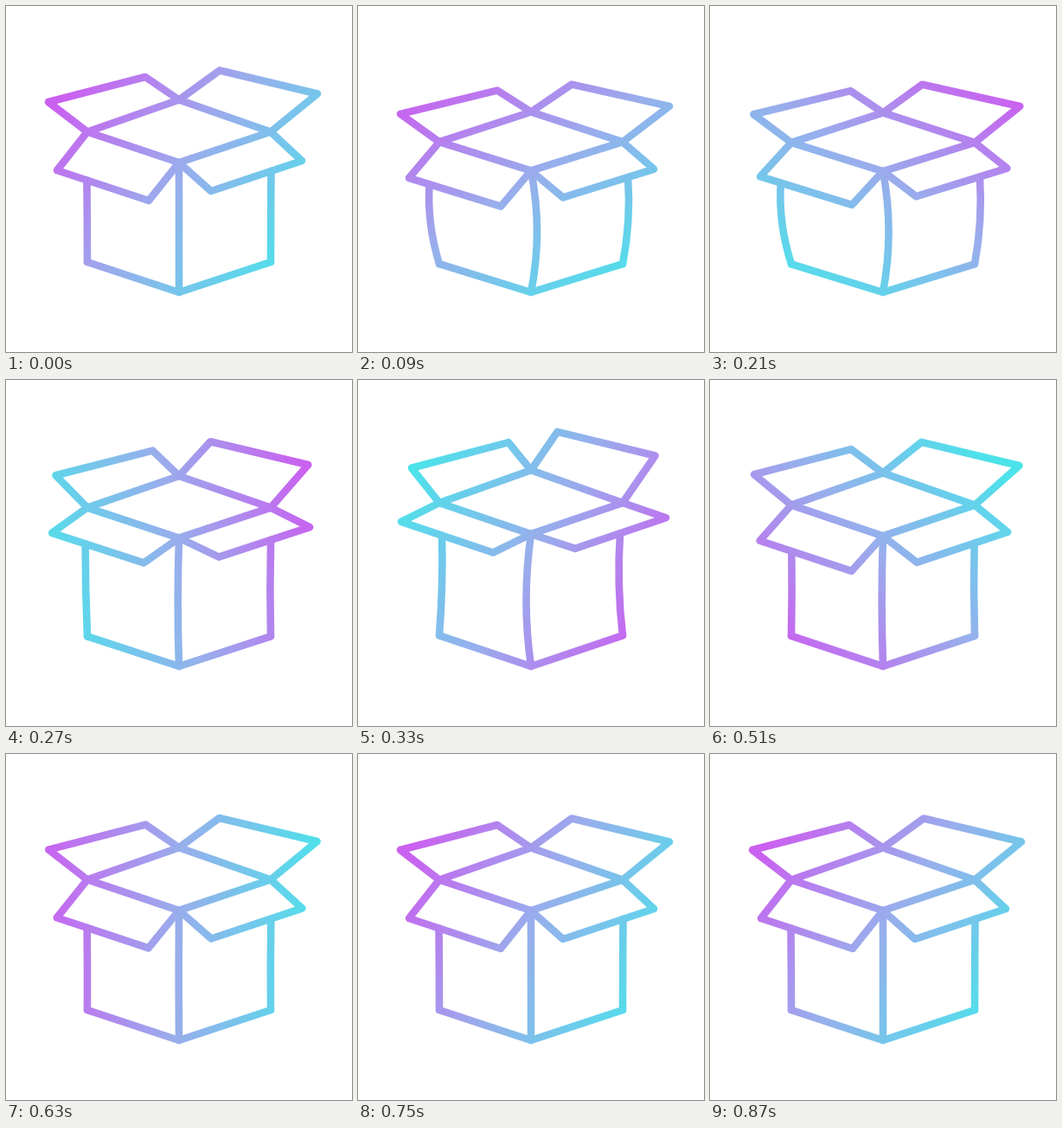
Animation, 400 px wide and 400 px high, one loop 2.9 s. Source, as an HTML page with a canvas:

```html
<!DOCTYPE html>
<html>
<head>
<meta charset="utf-8">
<style>
  html, body { margin: 0; width: 100%; height: 100%; overflow: hidden; background: #fff; }
  canvas { display: block; }
</style>
</head>
<body>
<canvas id="stage" width="400" height="400"></canvas>
<script>
const ctx = document.getElementById('stage').getContext('2d');
const LOOP = 2900, END = 870, STEP = 30;
const SQUASH = 150, PEAK = 330, FLOOR = 331;

const ramp = (t, a, b) => Math.min(1, Math.max(0, (t - a) / (b - a)));
const smooth = u => u * u * (3 - 2 * u);
const settle = (t, power) => (1 - ramp(t, PEAK, END)) ** power;

// cubic-bezier(.25, 0, .45, 1)
function spinEase(x) {
  let lo = 0, hi = 1;
  for (let i = 0; i < 24; i++) {
    const s = (lo + hi) / 2, r = 1 - s;
    if (0.75 * s * r * r + 1.35 * s * s * r + s ** 3 < x) lo = s; else hi = s;
  }
  return smooth(lo);
}

function gradient(t) {
  const angle = (215 + 360 * spinEase(t / END)) * Math.PI / 180;
  const dx = 164 * Math.cos(angle), dy = 164 * Math.sin(angle);
  const g = ctx.createLinearGradient(200 + dx, 200 + dy, 200 - dx, 200 - dy);
  g.addColorStop(0, '#ca60f0');
  g.addColorStop(0.5, '#98aeec');
  g.addColorStop(1, '#4ce2ea');
  return g;
}

function line(points, closed) {
  ctx.beginPath();
  points.forEach(p => ctx.lineTo(...p));
  if (closed) ctx.closePath();
  ctx.stroke();
}

function curve(from, bendX, to) {
  ctx.beginPath();
  ctx.moveTo(...from);
  ctx.quadraticCurveTo(bendX, (from[1] + to[1]) / 2, ...to);
  ctx.stroke();
}

function draw(t) {
  const rise = smooth(ramp(t, SQUASH, PEAK));
  const squash = smooth(ramp(t, 0, SQUASH)) * (1 - rise);
  const stretch = rise * settle(t, 3.5);
  const open = smooth(ramp(t, 180, PEAK)) * settle(t, 4.6);

  const scale = 1 - 0.097 * squash + 0.019 * stretch;
  const at = (x, y) => [x, FLOOR - (FLOOR - y) * scale];
  const bend = (x, a, b) => x + a * squash + b * stretch;
  const flap = (dx, dy, ...pts) => pts.map(([x, y]) => at(x + dx * open, y + dy * open));
  const onEdge = ([a, b], x) => [x, a[1] + (b[1] - a[1]) * (x - a[0]) / (b[0] - a[0])];

  ctx.clearRect(0, 0, 400, 400);
  ctx.strokeStyle = gradient(t);
  ctx.lineWidth = 8.6;
  ctx.lineCap = ctx.lineJoin = 'round';

  const back = at(200, 108.5), left = at(94, 145.5), front = at(200, 181), right = at(306, 145.5);
  const bottomL = at(94, 296), bottom = at(200, FLOOR), bottomR = at(306, 296);
  const frontL = flap(-9, -23, [59, 190], [165, 225]);
  const frontR = flap(14, -16.6, [237, 214], [342, 179]);

  line([back, right, front, left], true);
  line([left, ...flap(13, -5, [49, 111], [161, 82]), back]);
  line([back, ...flap(-16.5, -9.5, [247, 74.5], [360, 101.5]), right]);
  line([left, ...frontL, front]);
  line([front, ...frontR, right]);

  line([bottomL, bottom, bottomR]);
  curve(onEdge(frontL, bend(93.5, -17, 3.5)), bend(94, -22, 4.5), bottomL);
  curve(front, bend(200, 21.6, -11), bottom);
  curve(onEdge(frontR, bend(306.5, 8.5, -3.5)), bend(306, 15, -7), bottomR);
}

let start;
function tick(now) {
  start ??= now;
  const t = (now - start) % LOOP;
  draw(Math.min(END, Math.floor(t / STEP) * STEP));
  requestAnimationFrame(tick);
}
requestAnimationFrame(tick);
</script>
</body>
</html>
```
